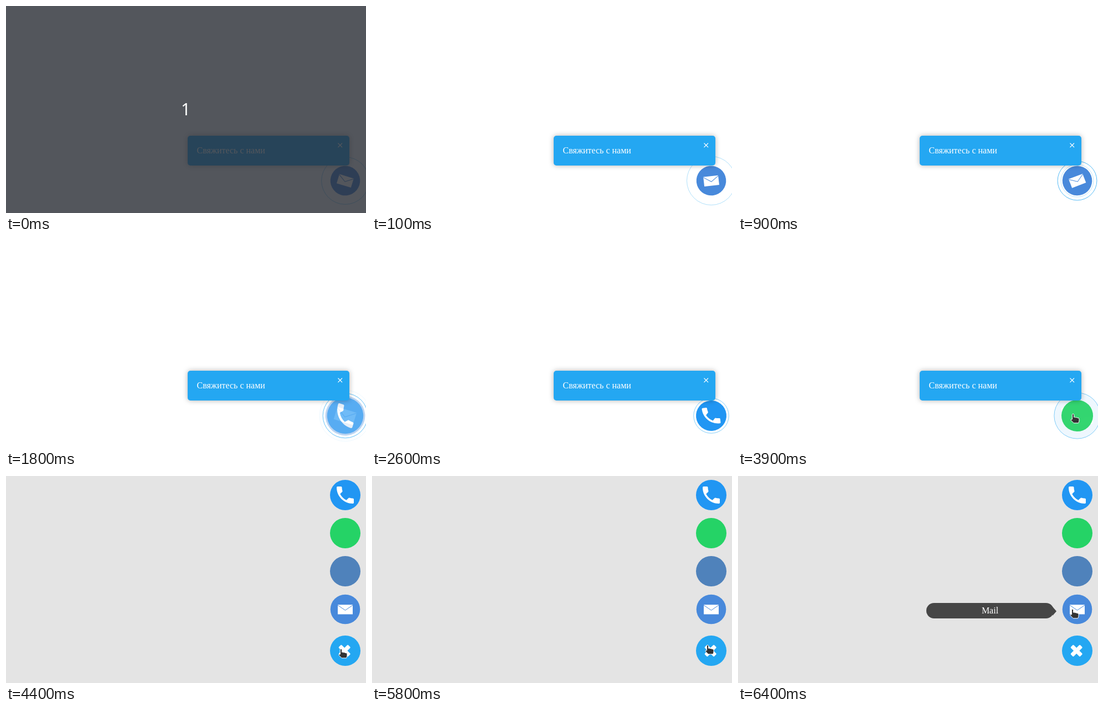
Recreate the animation shown at these times as an HTML page. Size 650 by 375 pixels, loop 8000 ms.

```html
<!DOCTYPE html>
<html lang="ru">
<head>
<meta charset="utf-8">
<title>Contact button</title>
<style>
  html, body { margin: 0; width: 100%; height: 100%; overflow: hidden; background: #fff; }
  svg { display: block; width: 650px; height: 375px; }
  text { fill: #fff; font: 16px "Liberation Serif", "Times New Roman", serif; }
  #count text { font: 30px "Noto Sans", "Open Sans", sans-serif; text-anchor: middle; }
  #card { filter: drop-shadow(0 0 5px rgba(0, 0, 0, .3)); }
  .ring { fill: none; stroke: #24a7f2; }
</style>
</head>
<body>
<svg viewBox="0 0 650 375">
  <defs>
    <g id="phone">
      <circle r="27.5" fill="#2196f3"/>
      <path fill="#fff" transform="scale(1.72) translate(-12 -12)" d="M6.62 10.79c1.44 2.83 3.76 5.14 6.59 6.59l2.2-2.2c.27-.27.67-.36 1.02-.24 1.12.37 2.33.57 3.57.57.55 0 1 .45 1 1V20c0 .55-.45 1-1 1-9.39 0-17-7.61-17-17 0-.55.45-1 1-1h3.5c.55 0 1 .45 1 1 0 1.25.2 2.45.57 3.57.11.35.03.74-.25 1.02z"/>
    </g>
    <circle id="chat" r="27.5" fill="#25d366"/>
    <circle id="social" r="27.5" fill="#4f82bb"/>
    <g id="mail">
      <circle r="26.8" fill="#4889db"/>
      <path fill="#fff" d="M-13.5-8.3h27V9h-27z"/>
      <path fill="none" stroke="#4889db" d="M-13.5-7.5L0 1.8 13.5-7.5"/>
    </g>
    <g id="close">
      <circle r="27.5" fill="#24a7f2"/>
      <g fill="#fff" transform="translate(-1.3 0)">
        <rect x="-12" y="-3.7" width="24" height="7.4" rx="1.6" transform="rotate(45)"/>
        <rect x="-12" y="-3.7" width="24" height="7.4" rx="1.6" transform="rotate(-45)"/>
      </g>
    </g>
  </defs>

  <rect id="shade" width="650" height="375" fill="#e4e4e4"/>
  <g id="closed">
    <circle class="ring" cx="612.5" cy="316.5"/>
    <circle class="ring" cx="612.5" cy="316.5"/>
    <use id="prev"/>
    <use id="next"/>
  </g>
  <g id="popup">
    <rect id="card" x="328" y="235" width="292" height="54" rx="5" fill="#24a7f2"/>
    <text x="344.5" y="267">Свяжитесь с нами</text>
    <path stroke="#fff" stroke-width="1.1" d="M599.5 248.5l7.5 7.5m0-7.5l-7.5 7.5"/>
  </g>
  <g id="menu">
    <use href="#phone"/>
    <use href="#chat"/>
    <use href="#social"/>
    <use href="#mail"/>
    <use href="#close"/>
  </g>
  <g id="tip">
    <path fill="#464646" d="M568 237l7 8-7 8z"/>
    <rect x="340" y="230" width="230" height="28" rx="14" fill="#464646"/>
    <text x="455" y="249" text-anchor="middle">Mail</text>
  </g>
  <g id="cursor" fill="#333" stroke="#fff" stroke-linejoin="round">
    <path id="hand" d="M-1.6 1.2Q0-1 1.6 1.2V6.3Q3.2 5.2 4.6 6.8 6.2 5.8 7.6 7.4 11 6.6 11 9.6V13Q10.6 15 9.6 16.8H1.2Q-1.6 14-4 11.6-4.4 9.4-1.6 10z"/>
    <path id="arrow" d="M0 0v15l3.6-3.2 2.4 5.4 2.6-1.2-2.4-5.2H11z"/>
  </g>
  <g id="count">
    <rect width="650" height="375" fill="#282c34" opacity=".8"/>
    <text x="324.5" y="198">1</text>
  </g>
</svg>
<script>
  const LOOP = 8000, STEP = 100, CLICK = 4000;
  const CX = 612.5, CY = 316.5;
  const $ = id => document.getElementById(id);
  const rings = document.querySelectorAll('.ring');
  const items = [...$('menu').children];
  const slots = [34.5, 103.5, 172.5, 241.5, CY];
  const cycle = ['social', 'mail', 'phone', 'chat'];

  // time, x, y of the pointer tip
  const track = [
    [2500, 628, 385], [2700, 622, 363], [3000, 610, 333], [3300, 605, 316],
    [3900, 605, 313], [5700, 605, 313], [5900, 607, 299], [6100, 606, 271],
    [6400, 604, 241]
  ];

  const clamp = v => Math.max(0, Math.min(1, v));
  const easeOut = v => 1 - (1 - clamp(v)) ** 2;
  const show = (id, on) => { $(id).style.display = on ? '' : 'none'; };

  function place(el, x, y, scale = 1, turn = 0, alpha = 1) {
    el.setAttribute('transform', `translate(${x} ${y}) rotate(${turn}) scale(${scale})`);
    el.setAttribute('opacity', alpha);
  }

  function pointerAt(t) {
    const i = track.findIndex(k => k[0] > t);
    if (i < 0) return track[track.length - 1].slice(1);
    const [t0, x0, y0] = track[Math.max(0, i - 1)];
    const [t1, x1, y1] = track[i];
    const p = t1 > t0 ? (t - t0) / (t1 - t0) : 0;
    return [x0 + (x1 - x0) * p, y0 + (y1 - y0) * p];
  }

  function drawRings(t) {
    rings.forEach((ring, i) => {
      const age = (t - 210 - i * 490 + LOOP) % 2000;
      const p = age / 1640;
      ring.setAttribute('r', 27 + 20 * p);
      ring.setAttribute('opacity', p < 1 ? 0.8 * Math.sin(Math.PI * p) : 0);
    });
  }

  // Icons swap every two seconds: the old one swells and fades, the new one settles.
  function drawButton(t) {
    const clock = t + 320;
    const n = Math.floor(clock / 2000);
    const p = easeOut((clock % 2000) / 300);
    const turn = 21 * Math.cos(2 * Math.PI * (t / 250 - 0.1));
    $('prev').setAttribute('href', '#' + cycle[n % 4]);
    $('next').setAttribute('href', '#' + cycle[(n + 1) % 4]);
    place($('prev'), CX, CY, 1 + 0.53 * p, turn, 1 - p);
    place($('next'), CX, CY, 1.53 - 0.53 * p, turn, p);
  }

  function drawMenu(t) {
    items.forEach((item, i) => {
      const delay = i === 4 ? 0 : (3 - i) * 40;
      const p = easeOut((t - CLICK - delay) / 250);
      place(item, CX, slots[i], i === 4 ? 1 : p, 0, p);
    });
  }

  function drawPointer(t) {
    const [x, y] = pointerAt(t);
    const over = cy => Math.hypot(x - CX, y - cy) < 27.5;
    const hand = over(CY) || (t > CLICK && over(slots[3]));
    show('cursor', t >= track[0][0]);
    show('hand', hand);
    show('arrow', !hand);
    place($('cursor'), x, y);
  }

  function render(t) {
    const open = t >= CLICK;
    const fade = 1 - clamp((t - CLICK) / 200);
    show('count', t < STEP);
    show('closed', fade > 0);
    $('closed').setAttribute('opacity', fade);
    $('popup').setAttribute('opacity', fade);
    show('popup', fade > 0);
    show('menu', open);
    $('shade').setAttribute('opacity', clamp((t - CLICK) / 300));
    show('tip', t >= 6200);
    $('tip').setAttribute('opacity', clamp((t - 6100) / 200));
    drawRings(t);
    drawButton(t);
    drawMenu(t);
    drawPointer(t);
  }

  const start = performance.now();
  function tick() {
    const t = (performance.now() - start) % LOOP;
    render(Math.floor(t / STEP) * STEP);
    requestAnimationFrame(tick);
  }
  tick();
</script>
</body>
</html>
```
